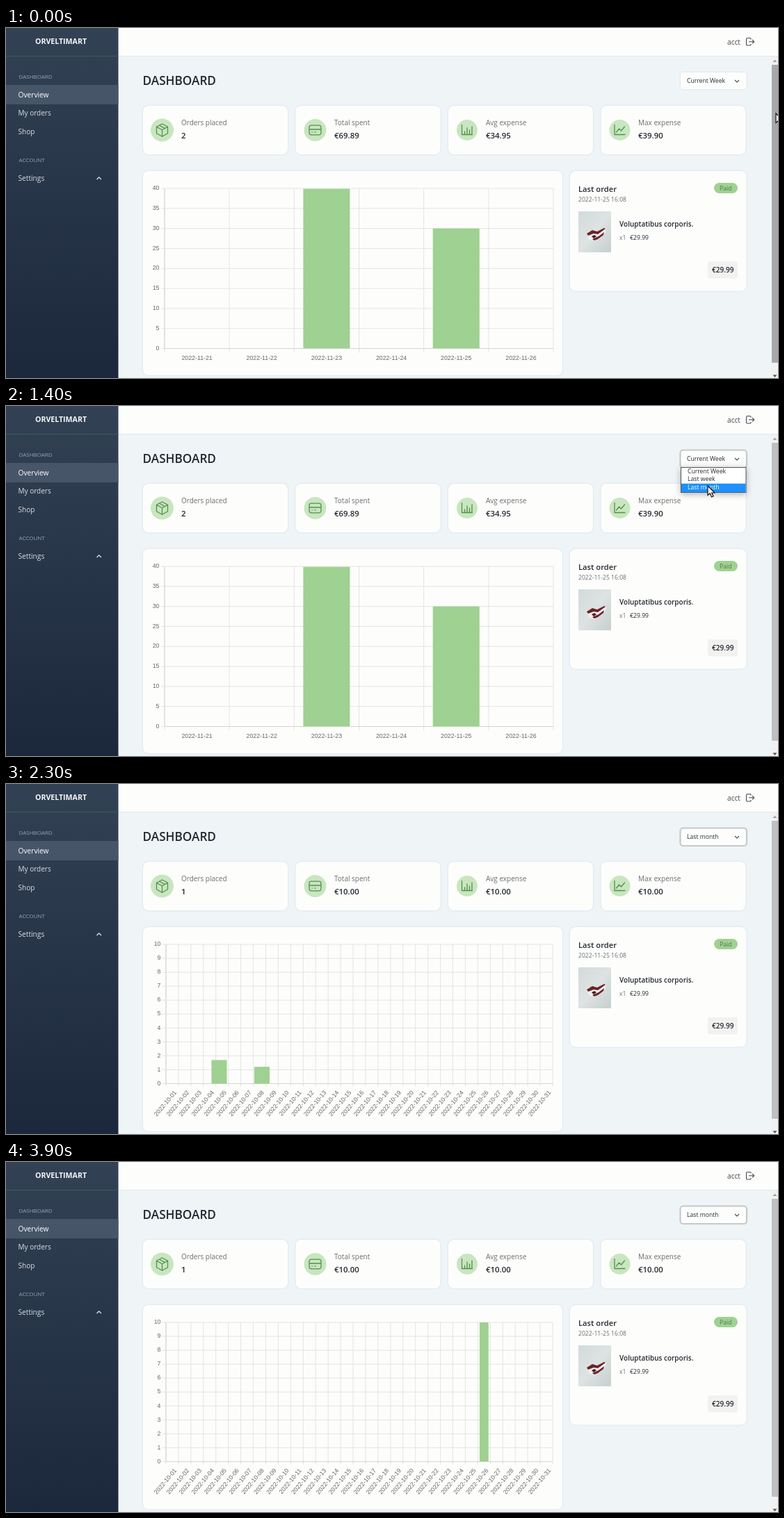
An HTML page that plays this animation: 1110 by 504 pixels, repeating every 4000 ms.

```html
<!DOCTYPE html>
<html lang="en">
<head>
<meta charset="utf-8">
<title>Dashboard</title>
<style>
html, body { margin: 0; width: 100%; height: 100%; overflow: hidden; background: #eff4f7; }
svg { display: block; width: 100%; height: 100%; font-family: "Open Sans", "Noto Sans", sans-serif; }
.card { fill: #fdfefc; filter: drop-shadow(0 .7px 1px #b9c6dc99); }
.icon { fill: none; stroke: #568f4d; stroke-width: 1.3; stroke-linecap: round; stroke-linejoin: round; }
.chart text { font: 8.8px "Liberation Sans", Arial, sans-serif; fill: #666; }
.grid { fill: none; stroke: #e3e5e0; }
.axis { fill: none; stroke: #d3d5d2; }
</style>
</head>
<body>
<svg id="stage" viewBox="0 0 1110 504" xmlns="http://www.w3.org/2000/svg"></svg>
<script>
const stage = document.getElementById('stage');
const GREEN = '#9fd192', DARK = '#23272f', GREY = '#6a6d72', PALE = '#d8dde5';

const text = (x, y, s, size, fill, weight = 400, extra = '') =>
  `<text x="${x}" y="${y}" font-size="${size}" fill="${fill}" font-weight="${weight}" ${extra}>${s}</text>`;
const rect = (x, y, w, h, fill, r = 0, extra = '') =>
  `<rect x="${x}" y="${y}" width="${w}" height="${h}" rx="${r}" fill="${fill}" ${extra}/>`;
const card = (x, y, w, h, r = 8) => rect(x, y, w, h, '#fdfefc', r, 'class="card"');
const path = (d, extra) => `<path d="${d}" ${extra}/>`;
const range = n => [...Array(n).keys()];
const two = n => String(n).padStart(2, '0');

const stats = [
  { x: 197, cx: 224.5, r: 16.5, tx: 252, label: 'Orders placed', values: ['2', '1'],
    icon: 'M224.5 138l8 4.3v9.4l-8 4.6l-8-4.6v-9.4zM216.5 142.3l8 4.5l8-4.5M224.5 146.8v9.5M220.5 140.2l8 4.4' },
  { x: 416.5, cx: 444.5, r: 16, tx: 472, label: 'Total spent', values: ['€69.89', '€10.00'],
    icon: 'M439 140.2h11a3 3 0 0 1 3 3v7.6a3 3 0 0 1-3 3h-11a3 3 0 0 1-3-3v-7.6a3 3 0 0 1 3-3zM436 146h17M440 150h.2M444 150h1' },
  { x: 636, cx: 663, r: 15, tx: 690, label: 'Avg expense', values: ['€34.95', '€10.00'],
    icon: 'M655.5 139.5v14h15M659.5 153v-4M663 153v-9M666.5 153v-6M670 153v-11' },
  { x: 855.5, cx: 882.5, r: 15, tx: 909, label: 'Max expense', values: ['€39.90', '€10.00'],
    icon: 'M875 139.5v14h15M877.5 150l4-5l3 3l5-6' }
];

const week = { left: 228, right: 787, base: 461.5, max: 40, step: 5, count: 6, tick: 6,
  date: i => `2022-11-${21 + i}` };
const month = { left: 230, right: 786, base: 431.5, max: 10, step: 1, count: 31, tick: 4,
  date: i => `2022-10-${two(i + 1)}` };
const TOP = 231;

const slot = c => (c.right - c.left) / c.count;
const centre = (c, i) => c.left + (i + .5) * slot(c);
const level = (c, v) => c.base - v / c.max * (c.base - TOP);

function axes(c) {
  const rows = range(c.max / c.step + 1).map(i => i * c.step);
  let grid = '', labels = '';
  for (const v of rows) {
    const y = level(c, v);
    grid += `M${c.left - 5} ${y}H${c.right}`;
    labels += `<text x="${c === week ? 220.5 : 222.5}" y="${y + 2.2}" text-anchor="end">${v}</text>`;
  }
  for (const i of range(c.count + 1)) grid += `M${c.left + i * slot(c)} ${TOP}V${c.base + c.tick}`;
  for (const i of range(c.count)) {
    const x = centre(c, i);
    labels += c === week
      ? `<text x="${x}" y="478" text-anchor="middle">${c.date(i)}</text>`
      : `<text transform="translate(${x + 4.5} 442.5) rotate(-50)" y="3" text-anchor="end">${c.date(i)}</text>`;
  }
  return path(grid, 'class="grid"') + path(`M${c.left} ${TOP}V${c.base}H${c.right}`, 'class="axis"') + labels;
}

const bar = (c, i, v) => ({ x: centre(c, i), w: slot(c) * .72, y: level(c, v), base: c.base });
const before = [bar(week, 2, 39.9), bar(week, 4, 29.99), bar(week, 25, 0)];
const after = [bar(month, 2, 0), bar(month, 4, 0), bar(month, 25, 10)];

const menu = ['Current Week', 'Last week', 'Last month'];

stage.innerHTML = `
<defs>
  <linearGradient id="side" x2="0" y2="1"><stop stop-color="#334155"/><stop offset="1" stop-color="#1b283b"/></linearGradient>
  <linearGradient id="photo" x2="1" y2="1"><stop stop-color="#d3dadb"/><stop offset=".5" stop-color="#dde3e2"/><stop offset="1" stop-color="#c6cecf"/></linearGradient>
  <clipPath id="area"><rect id="clip" y="${TOP - .5}"/></clipPath>
</defs>
${rect(0, 0, 1110, 504, '#eff4f7')}
${rect(162, 0, 948, 40, '#fdfefc')}${rect(162, 40, 948, 1, '#e3e8ef')}
${rect(0, 0, 161.5, 504, 'url(#side)')}${rect(0, 40, 161.5, 1, '#365f58')}
${rect(0, 82, 161.5, 28, '#475569')}
${text(79, 23, 'ORVELTIMART', 10.6, '#f4f6f8', 700, 'text-anchor="middle"')}
${text(18.5, 73, 'DASHBOARD', 8, '#98a3b3')}
${text(17.5, 99.5, 'Overview', 10.2, '#fff', 500)}
${text(17.5, 126, 'My orders', 10, PALE)}
${text(17.5, 152.5, 'Shop', 10, PALE)}
${text(18.5, 193, 'ACCOUNT', 8, '#98a3b3')}
${text(17.5, 220, 'Settings', 10.2, PALE)}
${path('M130.5 218l3.2-3.2l3.2 3.2', 'fill="none" stroke="#e2e6ec" stroke-width="1.3"')}
${text(1037, 24, 'acct', 10.2, '#444a52')}
${path('M1071 16.5v-1a1 1 0 0 0-1-1h-4a1.5 1.5 0 0 0-1.5 1.5v7.5a1.5 1.5 0 0 0 1.5 1.5h4a1 1 0 0 0 1-1v-1M1068 19.7h7.5m-2.5-2.7l2.7 2.7l-2.7 2.7', 'fill="none" stroke="#444a52" stroke-width="1.1"')}
${rect(1101, 41, 9, 463, '#f1f1f1')}${rect(1101, 53, 9, 429, '', 0, 'id="thumb"')}
${path('M1102.5 49l3-3.5l3 3.5z', 'fill="#a3a3a3"')}${path('M1102.5 499.5l3 3.5l3-3.5z', 'fill="#505050"')}
${text(196.5, 82, 'DASHBOARD', 17.2, DARK, 600)}
${stats.map(s => card(s.x, 112, 208, 70) +
  `<circle cx="${s.cx}" cy="147" r="${s.r}" fill="#c8e6c0"/>` + path(s.icon, 'class="icon"') +
  text(s.tx, 140, s.label, 10, GREY) + text(s.tx, 159, '', 11.4, DARK, 600, 'class="value"')).join('')}
${card(197, 206, 603, 294)}
<g class="chart"><g id="week">${axes(week)}</g><g id="month">${axes(month)}</g><g id="bars" clip-path="url(#area)"></g></g>
${card(811, 206, 253.5, 172.5)}
${text(823, 235.5, 'Last order', 11.2, DARK, 600)}
${text(823, 249.5, '2022-11-25 16:08', 8.6, GREY)}
${rect(1018, 223, 34, 15, GREEN, 7.5)}${text(1026, 233.5, 'Paid', 8.7, '#50794a')}
${rect(823, 264, 47, 59, 'url(#photo)')}
${path('M835 295l9-4l7 1l9-4l3 1l-2 7l-9 7l-6 4l-8-3z', 'fill="#f1efee"')}
${path('M835 296l8-5l7 2l10-5l2 1l-11 8l-6-1l-8 3zM843 304l9-4l8-6l-1 4l-8 6l-5 2z', 'fill="#6b2429"')}
${path('M842 300l4-2l3 2l-4 3z', 'fill="#3d2023"')}
${text(882, 286, 'Voluptatibus corporis.', 10, DARK, 600)}
${text(882, 304.5, 'x1', 8.6, GREY)}${text(897, 304.5, '€29.99', 8.6, DARK, 500)}
${rect(1009, 336, 43, 24.5, '#f2f3f1', 3)}${text(1015, 352, '€29.99', 10, DARK, 600)}
${rect(970, 64, 94.5, 24, '#fdfefc', 3, 'class="card"')}
${rect(969.5, 63.5, 95.5, 25.5, '#fdfefc', 4, 'id="ring" stroke="#c6c9cc" stroke-width="2.2"')}
${text(979, 79, '', 8.65, DARK, 400, 'id="chosen"')}
${path('M1048 75l3 3l3-3', 'fill="none" stroke="#454a52" stroke-width="1.1"')}
<g id="menu">
  ${rect(970.5, 88.5, 93.5, 36, '#fff', 0, 'stroke="#555" style="filter:drop-shadow(0 2px 5px #5557)"')}
  ${rect(971, 0, 92.5, 12.5, '#1e90ff', 0, 'id="hover"')}
  ${menu.map((s, i) => text(980, 96.7 + i * 11.6, s, 8.65, DARK, 400, 'class="option"')).join('')}
</g>
${path('M0 0V13.5L3.2 10.7L5.6 16L8 15L5.7 10H9.8Z', 'id="cursor" fill="#fff" stroke="#111" stroke-width="1.2"')}`;

const $ = id => document.getElementById(id);
const show = (id, on) => $(id).setAttribute('visibility', on ? 'visible' : 'hidden');
const mix = (a, b, p) => a + (b - a) * p;
const ease = p => p * p * (3 - 2 * p);
const outQuart = p => 1 - (1 - p) ** 4;

// time, x, y of the pointer
const route = [[0, 1107, 123], [400, 1010, 82], [900, 1010, 82], [1200, 1009, 115],
  [1500, 1009, 115], [1600, 1010, 115], [2000, 1010, 115], [2200, 1114, 108], [4000, 1114, 108]];

function pointer(t) {
  const i = route.findIndex(k => k[0] > t);
  const [a, b] = [route[i - 1], route[i]];
  const p = ease((t - a[0]) / (b[0] - a[0]));
  return [mix(a[1], b[1], p), mix(a[2], b[2], p)];
}

function draw(t) {
  const [x, y] = pointer(t);
  $('cursor').setAttribute('transform', `translate(${x} ${y})`);
  $('thumb').setAttribute('fill', x > 1100 && x < 1110 ? '#a8a8a8' : '#bfbfbf');

  const open = t >= 800 && t < 1600;
  const row = y < 99 ? 0 : y < 111 ? 1 : 2;
  show('menu', open);
  show('ring', t >= 700);
  $('hover').setAttribute('y', 88.5 + row * 11.6);
  document.querySelectorAll('.option').forEach((o, i) => o.setAttribute('fill', i === row ? '#fff' : DARK));
  $('chosen').textContent = menu[t < 1600 ? 0 : 2];

  const loaded = t >= 2100;
  const c = loaded ? month : week;
  show('week', !loaded);
  show('month', loaded);
  document.querySelectorAll('.value').forEach((v, i) => v.textContent = stats[i].values[+loaded]);
  $('clip').setAttribute('x', c.left);
  $('clip').setAttribute('width', c.right - c.left);
  $('clip').setAttribute('height', c.base - TOP + .5);

  const p = loaded ? outQuart(Math.min(1, (t - 1910) / 1090)) : 0;
  $('bars').innerHTML = before.map((b, i) => {
    const [bx, w, top, base] = ['x', 'w', 'y', 'base'].map(k => mix(b[k], after[i][k], p));
    return rect(bx - w / 2, top, w, Math.max(0, base - top), GREEN);
  }).join('');
}

const start = performance.now();
function loop() {
  const t = (performance.now() - start) % 4000;
  draw(Math.floor(t / 100) * 100); // the screen refreshes ten times a second
  requestAnimationFrame(loop);
}
loop();
</script>
</body>
</html>
```
